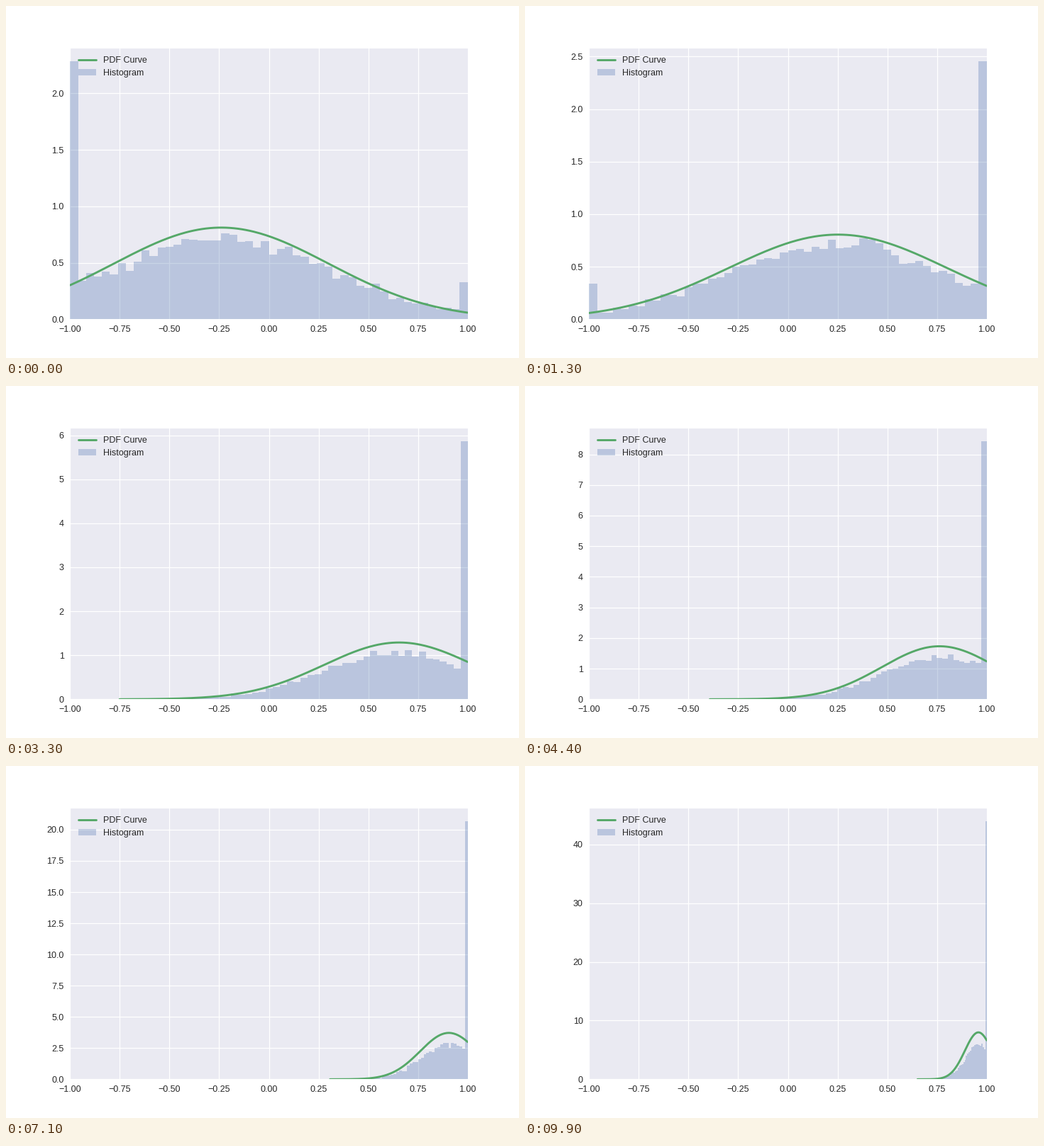
A matplotlib script for the animation above (10 s loop, 723 by 497 pixels).

```python
import math

import matplotlib.pyplot as plt
import numpy as np
from matplotlib.animation import FuncAnimation
from matplotlib.patches import Patch

W, H, DPI = 723, 497, 128
PX = 72 / DPI  # points per pixel
FRAMES, INTERVAL = 100, 100
SAMPLES, BINS = 10000, 50
BLUE, GREEN, INK = "#4C72B0", "#55A868", "#262626"

plt.rcParams.update({
    "font.family": "Liberation Sans",
    "font.size": 12.5 * PX,
    "text.color": INK,
    "xtick.color": INK,
    "ytick.color": INK,
})

# time step, mean, spread, lowest sample in spreads below the mean
KEYS = np.array([
    (0, -0.240, 0.5405, 3.80),
    (6, 0.001, 0.5758, 3.80),
    (21, 0.465, 0.477, 3.80),
    (33, 0.655, 0.377, 3.73),
    (55, 0.835, 0.2185, 4.23),
    (71, 0.905, 0.144, 4.15),
    (99, 0.9583, 0.0685, 4.47),
])
STEP, MEAN, SPREAD, REACH = KEYS.T


def smooth(t, xs, ys):
    """Cubic Hermite interpolation through the key points."""
    slope = np.gradient(ys, xs, edge_order=2)
    i = min(np.searchsorted(xs, t, side="right") - 1, len(xs) - 2)
    h = xs[i + 1] - xs[i]
    u = (t - xs[i]) / h
    return ((1 + 2 * u) * (1 - u) ** 2 * ys[i]
            + u * (1 - u) ** 2 * h * slope[i]
            + u * u * (3 - 2 * u) * ys[i + 1]
            + u * u * (u - 1) * h * slope[i + 1])


def policy(t):
    mu = 1 - math.exp(smooth(t, STEP, np.log(1 - MEAN)))
    sigma = math.exp(smooth(t, STEP, np.log(SPREAD)))
    low = max(-1.0, mu - np.interp(t, STEP, REACH) * sigma)
    return mu, sigma, low


def cdf(x, mu, sigma):
    return 0.5 * (1 + math.erf((x - mu) / (sigma * math.sqrt(2))))


def truncated_pdf(x, mu, sigma):
    mass = cdf(1, mu, sigma) - cdf(-1, mu, sigma)
    bell = np.exp(-0.5 * ((x - mu) / sigma) ** 2)
    return bell / (sigma * math.sqrt(2 * math.pi) * mass)


def clipped_histogram(t, mu, sigma, low):
    """Density of normal samples clipped to [-1, 1], with steady end bins."""
    edges = np.linspace(low, 1, BINS + 1)
    cum = np.array([cdf(e, mu, sigma) for e in edges])
    cum[0], cum[-1] = 0, 1
    share = np.diff(cum)
    inner = np.random.default_rng(40 + t).poisson(SAMPLES * share[1:-1])
    share[1:-1] = inner / SAMPLES
    return share / (edges[1] - edges[0]), edges


fig = plt.figure(figsize=(W / DPI, H / DPI), dpi=DPI, facecolor="white")
ax = fig.add_axes([0.125, 0.11, 0.775, 0.77], facecolor="#EAEAF2")
ax.set_axisbelow(True)
ax.grid(color="white", linewidth=1.25 * PX)
ax.tick_params(length=0, pad=8.75 * PX)
for spine in ax.spines.values():
    spine.set_visible(False)
ax.set_xlim(-1, 1)

bars = ax.stairs(np.zeros(BINS), np.linspace(-1, 1, BINS + 1),
                 fill=True, color=BLUE, alpha=0.3, linewidth=0)
curve, = ax.plot([], [], color=GREEN, linewidth=2.9 * PX,
                 solid_capstyle="round")
ax.legend([curve, Patch(facecolor=BLUE, alpha=0.3, linewidth=0)],
          ["PDF Curve", "Histogram"], loc="upper left", frameon=False)


def update(t):
    mu, sigma, low = policy(t)
    heights, edges = clipped_histogram(t, mu, sigma, low)
    bars.set_data(heights, edges, 0)
    x = np.linspace(low, 1, 200)
    curve.set_data(x, truncated_pdf(x, mu, sigma))
    ax.set_ylim(0, 1.05 * heights.max())
    return bars, curve


anim = FuncAnimation(fig, update, frames=FRAMES, interval=INTERVAL,
                     init_func=lambda: update(0), repeat=True,
                     repeat_delay=0, blit=False)
plt.show()
```
